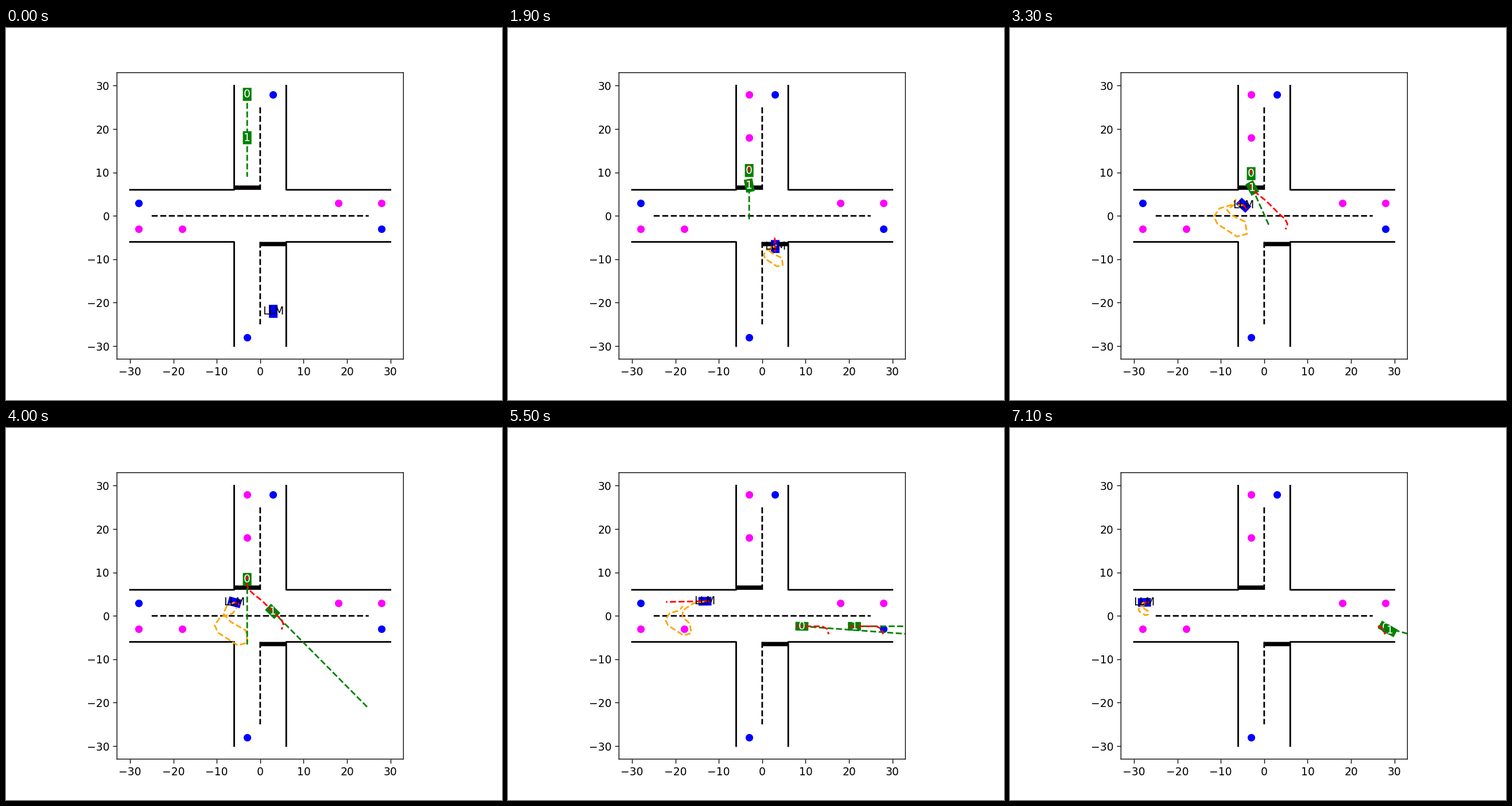
Animation of 864 by 648 pixels, one loop 7200 ms. Source, as a matplotlib script:

```python
import numpy as np
import matplotlib.pyplot as plt
from matplotlib.animation import FuncAnimation
from matplotlib.patches import Polygon, Rectangle

FRAMES, STEP_MS = 72, 100
REAR = 1.2      # plans start this far behind a car's centre
HOOK = 1.3      # length of each bend at the end of a plan
HORIZON = 7.5   # steps the blue car plans ahead

# path.snap off keeps edges on exact sub-pixel positions
plt.rcParams.update({"path.snap": False, "axes.linewidth": 0.72,
                     "xtick.major.width": 0.72, "ytick.major.width": 0.72})


def unit(deg):
    a = np.radians(deg)
    return np.array([np.cos(a), np.sin(a)])


def smooth(q, x, y):
    """Monotone cubic interpolation of y(x) at q."""
    h = np.diff(x)
    d = np.diff(y) / h
    prod = d[:-1] * d[1:]
    same = prod > 0
    inner = np.where(same, 2 * prod / np.where(same, d[:-1] + d[1:], 1), 0)
    m = np.concatenate([d[:1], inner, d[-1:]])
    i = np.clip(np.searchsorted(x, q, side="right") - 1, 0, len(h) - 1)
    u = (q - x[i]) / h[i]
    return (y[i] * (1 + 2 * u) * (1 - u) ** 2 + h[i] * m[i] * u * (1 - u) ** 2
            + y[i + 1] * u ** 2 * (3 - 2 * u) + h[i] * m[i + 1] * u ** 2 * (u - 1))


class Route:
    def __init__(self, *pts):
        self.pts = np.array(pts, float)
        self.u = np.r_[0, np.cumsum(np.hypot(*np.diff(self.pts, axis=0).T))]

    def pos(self, s):
        return np.stack([smooth(s, self.u, c) for c in self.pts.T], axis=-1)

    def heading(self, s):
        dx, dy = self.pos(s + 0.05) - self.pos(s - 0.05)
        return np.degrees(np.arctan2(dy, dx))

    def piece(self, a, b):
        return self.pos(np.linspace(a, max(a + 0.05, b), 40))


def rise(x, ramp):
    """Distance covered x steps after starting to speed up to 1 within ramp steps."""
    x = max(x, 0)
    return x * x / (2 * ramp) if x < ramp else x - ramp / 2


def glide(t, start, brake, speed, ramp=6):
    return speed * (rise(t - start, ramp) - rise(t - brake, ramp))


class Car:
    def __init__(self, ax, label, colors, z, route, offset, legs):
        fill, ink, guess = colors
        self.route, self.offset, self.legs = route, offset, legs
        self.body = ax.add_patch(Polygon(np.zeros((4, 2)), fc=fill, ec="none", zorder=z))
        self.guess, = ax.plot([], [], "--", color=guess, zorder=z + 0.1)
        self.plan, = ax.plot([], [], "r--", zorder=z + 0.2)
        self.text = ax.text(0, 0, label, color=ink, ha="center", va="center",
                            zorder=z + 0.3)

    def dist(self, t):
        return self.offset + sum(glide(t, *leg) - glide(0, *leg) for leg in self.legs)

    def pos(self, t):
        return self.route.pos(self.dist(t))

    def velocity(self, t):
        return self.pos(t) - self.pos(t - 1)

    def update(self, t):
        s = self.dist(t)
        pos, deg = self.pos(t), self.route.heading(s)
        f, n = unit(deg) * 1.5, unit(deg + 90)
        self.body.set_xy([pos + f + n, pos + f - n, pos - f - n, pos - f + n])
        self.text.set_position(pos)
        self.guess.set_data(*self.guess_line(t).T)
        self.plan.set_data(*self.plan_line(t, s).T)
        self.plan.set_visible(t > 0)


class GreenCar(Car):
    waypoints = (32, 41.4, 53.9)

    def guess_line(self, t):
        """Constant-velocity forecast."""
        pos = self.pos(t)
        return np.array([pos, pos + min(9 + t, 24) * self.velocity(t)])

    def plan_line(self, t, s):
        """Up to the holding point, later to the next waypoint with a right bend."""
        launch = self.legs[1][0]
        waiting = t < launch
        if waiting:
            goal = self.dist(launch)
        else:
            goal = next((w for w in self.waypoints if w > s + 1), self.waypoints[-1])
        line = self.route.piece(min(s - REAR, goal - 0.1), goal)
        if waiting:
            return line
        deg = self.route.heading(goal)
        bend = line[-1] + HOOK * unit(deg - 27)
        return np.vstack([line, bend, bend + HOOK * unit(deg - 72)])


class BlueCar(Car):
    loop = np.array([(0, 0), (-1.7, -.7), (-2.6, -2.6), (-.9, -4.5), (2.6, -6.5), (3, -9.3),
                     (.7, -9.9), (-3.8, -7), (-4.6, -5.3), (-3.3, -3.4), (-.5, -2.6),
                     (.5, -1.3)])

    def guess_line(self, t):
        """A loop below the car, pushed ahead by its speed."""
        if t == 0:
            return np.empty((0, 2))
        size = np.interp(t, [11, 26, 48, 71], [0.1, 1, 1, 0.3])
        push = np.clip(np.linspace(0, 3, len(self.loop)), 0, 1)[:, None]
        return self.pos(t) + size * self.loop + 4.6 * push * self.velocity(t)

    def plan_line(self, t, s):
        speed = s - self.dist(t - 1)
        ahead = min(self.dist(t + HORIZON) - s, HORIZON * speed)
        return self.route.piece(s - REAR, s + ahead)


def draw_road(ax):
    for sx in (-1, 1):
        for sy in (-1, 1):
            ax.plot([30 * sx, 6 * sx, 6 * sx], [6 * sy, 6 * sy, 30 * sy], "k")
    ax.plot([-25, 25], [0, 0], "k--")
    ax.plot([0, 0], [25, 6], "k--")
    ax.plot([0, 0], [-6, -25], "k--")
    for corner in ((-6, 6), (0, -7)):
        ax.add_patch(Rectangle(corner, 6, 1, fc="black", ec="none"))
    exits = [(3, 28), (-28, 3), (28, -3), (-3, -28)]
    starts = [(-3, 28), (-3, 18), (18, 3), (28, 3), (-28, -3), (-18, -3)]
    for pts, color in ((exits, "blue"), (starts, "magenta")):
        ax.plot(*zip(*pts), "o", color=color)


fig, ax = plt.subplots(figsize=(6.4, 4.8), dpi=135)
ax.set(xlim=(-33, 33), ylim=(-33, 33), aspect="equal",
       xticks=range(-30, 31, 10), yticks=range(-30, 31, 10))
draw_road(ax)

to_east = Route((-3, 28), (-3, 18), (-3, 7.2), (-2.85, 6.6), (0.7, 3.2), (4.8, -0.7),
                (7.2, -2.2), (9.3, -2.4), (21.3, -2.4), (27, -2.4), (29.1, -3.4))
to_west = Route((3, -22), (3, -7), (2.6, -4), (-2.5, -1.2), (-4.7, 2.4), (-6, 3.15),
                (-8, 3.4), (-28, 3.1))
blue = ("blue", "black", "orange")
green = ("green", "white", "green")

# Each leg: start, brake, speed and, where it differs, ramp
cars = [
    BlueCar(ax, "LLM", blue, 3, to_west, 0,
            [(-0.8, 13.4, 1.05), (18, 30.7, 1.15), (45.9, 64, 1.2)]),
    GreenCar(ax, "0", green, 4, to_east, 0, [(-20, 14, 1, 8.5), (36.3, 80, 1.18)]),
    GreenCar(ax, "1", green, 5, to_east, 10, [(-20, 5, 1, 12), (30.55, 58.1, 1.3)]),
]


def update(t):
    for car in cars:
        car.update(t)
    return []


anim = FuncAnimation(fig, update, frames=FRAMES, interval=STEP_MS, repeat=True,
                     repeat_delay=0, init_func=lambda: update(0))
plt.show()
```
